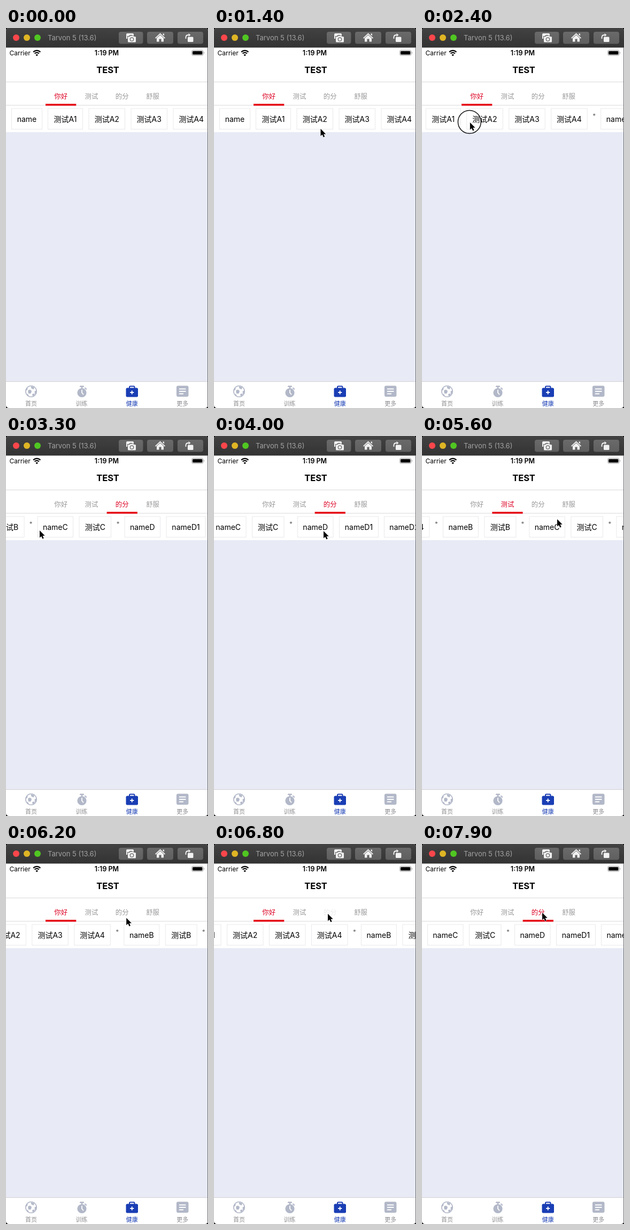
Write an HTML page that moves like this. It is 378 by 708 pixels and loops after 8000 ms.

```html
<!DOCTYPE html>
<html lang="zh">
<head>
<meta charset="utf-8">
<style>
html, body { margin: 0; width: 100%; height: 100%; overflow: hidden; background: #000; }
svg { display: block; width: 378px; height: 708px; }
text { font-family: Inter, "Noto Sans CJK SC", "Noto Sans CJK", "Noto Sans", sans-serif; }
.mid { text-anchor: middle; }
</style>
</head>
<body>
<svg viewBox="0 0 378 708">
  <defs>
    <linearGradient id="bar" x2="0" y2="1">
      <stop offset="0" stop-color="#434242"/><stop offset="1" stop-color="#343333"/>
    </linearGradient>
    <linearGradient id="key" x2="0" y2="1">
      <stop offset="0" stop-color="#6b6a6a"/><stop offset="1" stop-color="#605f5f"/>
    </linearGradient>
    <clipPath id="window"><rect width="378" height="708" rx="5"/></clipPath>
    <clipPath id="strip"><rect y="145" width="377" height="49"/></clipPath>
  </defs>
  <g clip-path="url(#window)">
    <rect width="378" height="708" fill="#fff"/>
    <rect width="378" height="36.5" fill="url(#bar)"/>
    <circle cx="19" cy="18" r="6" fill="#fb464b"/>
    <circle cx="39" cy="18" r="6" fill="#dfb524"/>
    <circle cx="59" cy="18" r="6" fill="#50c622"/>
    <text x="78" y="23" font-size="13" fill="#a3a2a2">Tarvon 5 (13.6)</text>
    <g fill="url(#key)">
      <rect x="211" y="7" width="45.5" height="22.5" rx="4"/>
      <rect x="264" y="7" width="49" height="22.5" rx="4"/>
      <rect x="321" y="7" width="48" height="22.5" rx="4"/>
    </g>
    <!-- camera, home, rotate -->
    <g fill="#f2f2f2">
      <path d="M225 20V12q0-2 2-2h10q2 0 2 2v2h-2l-1-1h-4l-2 2h-3v5z"/>
      <path d="M229 16.5h2.5l1.5-2h5l1.5 2h2q1.500 1.500 1.500v7q0 1.500-1.500 1.500h-12q-1.500 0-1.500-1.500v-7q0-1.500 1.500-1.500z" style="display:none"/>
      <rect x="228" y="16" width="15" height="10.500" rx="1.500"/>
      <rect x="232" y="14.500" width="7" height="3" rx="1"/>
      <circle cx="235.500" cy="21" r="3.200" fill="none" stroke="#686767" stroke-width="1.300"/>
      <path d="M288.500 9.500l9.500 9-1.200 1.200-8.300-7.700-8.300 7.700-1.200-1.200zM293.500 10.500h2.500v4l-2.500-2.300z"/>
      <path d="M282 19l6.500-6 6.500 6v6.500h-4.500v-5h-4v5H282z"/>
      <rect x="340" y="16.500" width="10.500" height="9.500" rx="1.500"/>
      <path d="M341.500 10v6l-4-3z" transform="rotate(180 341.500 13)"/>
    </g>
    <path d="M336.500 20v-2.500q0-4.500 5-4.500" fill="none" stroke="#f2f2f2" stroke-width="1.800"/>

    <text x="6.500" y="51" font-size="12">Carrier</text>
    <g fill="none" stroke="#000" stroke-width="2.200">
      <path d="M51 44.700q6.700-5.600 13.400 0M53.500 47.500q4.200-3.400 8.400 0"/>
    </g>
    <path d="M55.300 49.800q2.400-1.800 4.800 0l-2.400 2.700z"/>
    <text class="mid" x="188.500" y="51" font-size="12.500" font-weight="600">1:19 PM</text>
    <rect x="347.500" y="41.500" width="21.500" height="9.500" rx="2.800" fill="none" stroke="#999"/>
    <rect x="349" y="43" width="18.500" height="6.500" rx="1.500"/>
    <path d="M370.300 44.300q2 1.900 0 3.800z" fill="#999"/>
    <text class="mid" x="190.500" y="84" font-size="16.500" font-weight="700">TEST</text>

    <path d="M0 100.500H377M0 144H377" stroke="#d9d9dc"/>
    <g id="tabs"></g>
    <rect id="mark" y="141.300" width="57.300" height="3.400" fill="#e6000f"/>
    <rect y="194" width="378" height="464" fill="#e8ebf5"/>
    <g clip-path="url(#strip)"><g id="items"></g></g>

    <path d="M0 658.700H377" stroke="#cbcace"/>
    <!-- ball -->
    <circle cx="47" cy="677" r="10.200" fill="#fff" stroke="#b2b8c8" stroke-width="1.600"/>
    <g fill="#b2b8c8">
      <path d="M43.500 675l4-2 3 3-1.500 4.500-4.500.200z" transform="translate(-2.500 .5)"/>
      <path d="M47 667.500l6 2-1.500 4-4.500-2.500zM57 675l-3.500 2 .5 5 2.500-.5zM39 670l2 2-2.500 3.500-2-.5zM49 682l4-1 1 2-4 3.500zM38 681l4 2v3z"/>
    </g>
    <!-- stopwatch -->
    <g fill="#b2b8c8">
      <circle cx="142" cy="679.500" r="8.600"/>
      <rect x="138" y="666.500" width="8" height="2.400" rx="1"/>
      <rect x="140.800" y="668" width="2.400" height="4"/>
      <path d="M148 669.500l3.500 3-1.500 1.500-3.500-3z"/>
    </g>
    <path d="M142 674v5.500l3 3.500" fill="none" stroke="#fff" stroke-width="1.800"/>
    <!-- medical bag -->
    <rect x="231" y="667.500" width="9.500" height="6" rx="1.500" fill="none" stroke="#193db4" stroke-width="2"/>
    <rect x="224.500" y="670.500" width="22.500" height="17" rx="2.500" fill="#193db4"/>
    <path d="M235.700 675.500v7M232.200 679h7" stroke="#fff" stroke-width="1.800"/>
    <!-- list -->
    <rect x="319" y="666.500" width="22.500" height="20.500" rx="3" fill="#b2b8c8"/>
    <path d="M324 672.500h12.500M324 677h12.500M324 681.500h8" stroke="#fff" stroke-width="1.800"/>
    <g id="nav"></g>

    <path d="M377.500 36V708" stroke="#6c6c70"/>
    <g id="cursor">
      <circle id="ring" cx="-1" cy="-1" r="21.500" fill="none" stroke="#111" stroke-width="1.500"/>
      <path d="M0 0V13.500L3.100 10.700 5.300 15.600 7.700 14.500 5.500 9.800H9.700Z" fill="#000" stroke="#fff" stroke-width="1" paint-order="stroke"/>
    </g>
  </g>
</svg>
<script>
const LOOP = 8000;
const TAB_X = 74, TAB_W = 57.3;
const $ = id => document.getElementById(id);

function add(parent, tag, attrs, text) {
  const el = document.createElementNS("http://www.w3.org/2000/svg", tag);
  for (const k in attrs) el.setAttribute(k, attrs[k]);
  if (text) el.textContent = text;
  parent.appendChild(el);
  return el;
}

// Scrolling strip: [label, left, width]
const chips = [
  ["name", 10, 58], ["测试A1", 78, 66], ["测试A2", 154.5, 68.5], ["测试A3", 233.5, 68.5], ["测试A4", 312.5, 68.5],
  ["nameB", 405.5, 67], ["测试B", 483, 60],
  ["nameC", 567, 67.5], ["测试C", 645, 60.5],
  ["nameD", 730, 67.5], ["nameD1", 808, 74], ["nameD2", 892, 76], ["nameD3", 978.5, 76.5], ["nameD4", 1065, 76.5], ["测试D", 1152, 61]
];
for (const [label, x, w] of chips) {
  add($("items"), "rect", { x: x + .5, y: 150, width: w - 1, height: 38.5, fill: "#fff", stroke: "#e9e9ec" });
  add($("items"), "text", { class: "mid", x: x + w / 2, y: 174.5, "font-size": 14 }, label);
}
for (const x of [393.5, 555, 718]) add($("items"), "circle", { cx: x, cy: 161.5, r: 2.1, fill: "#8e8e90" });

const tabs = ["你好", "测试", "的分", "舒服"].map((label, i) =>
  add($("tabs"), "text", { class: "mid", x: TAB_X + TAB_W * (i + .5), y: 131.5, "font-size": 12.4 }, label));
["首页", "训练", "健康", "更多"].forEach((label, i) =>
  add($("nav"), "text", { class: "mid", x: 47 + 94.4 * i, y: 704, "font-size": 11, fill: i === 2 ? "#193db4" : "#8f8f93" }, label));

const clamp = u => Math.max(0, Math.min(1, u));
const part = (t, a, b) => clamp((t - a) / (b - a));
const smooth = u => u * u * (3 - 2 * u);
const glide = (t, start, from, to) => to + (from - to) * Math.exp(-2 * (t - start) / 1000);

function scrollAt(t) {
  if (t < 2450) return 118 * part(t, 2230, 2450) ** 2;
  if (t < 4050) return glide(t, 2450, 118, 595.5);
  if (t < 4250) return 576 + 114 * part(t, 4050, 4250) ** 2;
  if (t < 4400) return 690 + 152 * part(t, 4250, 4400);
  if (t < 4950) return 842 + 16 * Math.sin(Math.PI * part(t, 4400, 4700));
  if (t < 5200) return 842 - 156 * part(t, 4950, 5200) ** 1.86;
  if (t < 6900) return glide(t, 5200, 686, 107);
  return 126.3 + 430.7 * smooth(part(t, 6900, 7250));
}

const starts = [0, 395.5, 557, 720];
function activeTab(t, scroll) {
  if (t >= 6900) return 2;
  return starts.filter(s => s - scroll <= 100).length - 1;
}

// Pointer path: [time, x, y]
const path = [
  [80, 236, 12], [700, 212, 330], [860, 212, 330], [1200, 200, 188], [1350, 200, 188], [2200, 154, 175],
  [2230, 154, 175], [2400, 91, 176], [2450, 48, 176], [2700, 56, 176], [3300, 63, 176], [4000, 205, 177],
  [4050, 205, 177], [4250, 104, 177], [4700, 102, 177], [4950, 100, 177], [5200, 245, 160],
  [5600, 253, 155], [6550, 213, 130], [7400, 213, 130], [7600, 217, 129], [7700, 217, 129], [7900, 225, 128]
];
function pointerAt(t, scroll) {
  if (t > 2230 && t < 2450) return [154 - .9 * scroll, 176];
  let i = 0;
  while (i < path.length - 2 && t > path[i + 1][0]) i++;
  const [a, ax, ay] = path[i], [b, bx, by] = path[i + 1];
  const u = smooth(part(t, a, b));
  return [ax + (bx - ax) * u, ay + (by - ay) * u];
}

const presses = [[2180, 2450], [4030, 4250], [4940, 5200], [6650, 6780]];
const pressed = t => presses.some(([a, b]) => t >= a && t < b);

function draw(t) {
  const scroll = scrollAt(t), active = activeTab(t, scroll);
  const [x, y] = pointerAt(t, scroll);
  $("items").setAttribute("transform", `translate(${-scroll} 0)`);
  $("mark").setAttribute("x", TAB_X + TAB_W * active);
  tabs.forEach((tab, i) => tab.setAttribute("fill", i === active ? "#dc0022" : "#97979a"));
  const fade = part(t, 6650, 6790) - part(t, 6810, 7000);
  tabs[2].setAttribute("opacity", 1 - .8 * fade);
  $("cursor").setAttribute("transform", `translate(${x} ${y})`);
  $("cursor").setAttribute("visibility", t < 80 ? "hidden" : "visible");
  $("ring").setAttribute("opacity", pressed(t) ? 1 : 0);
}

const begin = performance.now();
function tick() {
  draw((performance.now() - begin) % LOOP);
  requestAnimationFrame(tick);
}
tick();
</script>
</body>
</html>
```
